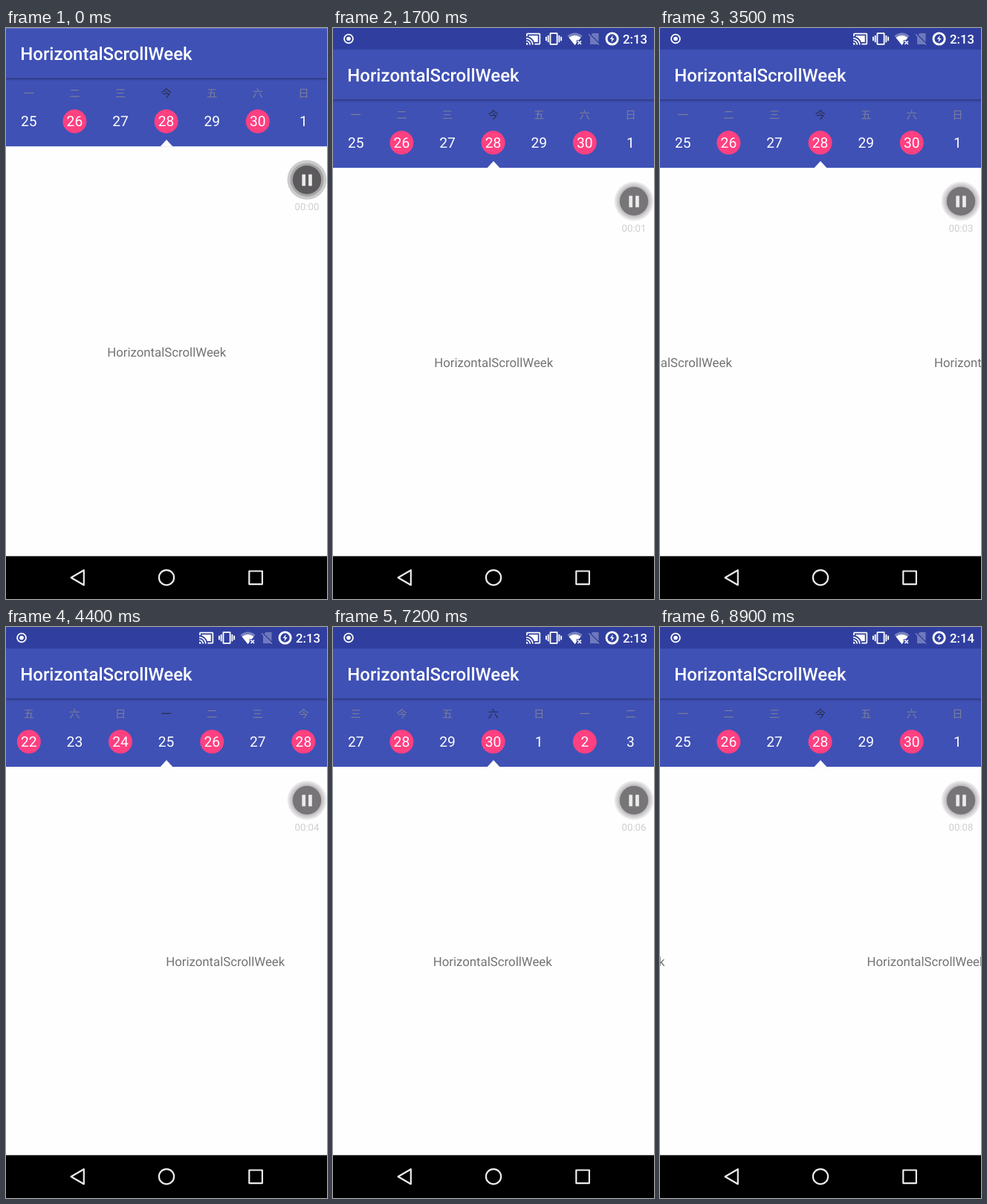
These frames come from a looping animation (432x768 px, 9000 ms). An HTML page:

```html
<!DOCTYPE html>
<html lang="zh">
<head>
<meta charset="utf-8">
<title>HorizontalScrollWeek</title>
<style>
  html, body { margin: 0; width: 100%; height: 100%; overflow: hidden; background: #fefefe; }
  svg { display: block; width: 432px; height: 768px; font-family: Roboto, sans-serif; text-rendering: geometricPrecision; }
  .mid { text-anchor: middle; }
  .label { font: 300 14.4px "Noto Sans CJK SC", "Noto Sans CJK", sans-serif; }
  .date { font-size: 19.2px; fill: #fff; }
  .page { font-size: 16.8px; fill: #737373; }
</style>
</head>
<body>
<svg viewBox="0 0 432 768">
  <defs>
    <linearGradient id="shade" x2="0" y2="1">
      <stop offset="0" stop-color="#000" stop-opacity=".18"/>
      <stop offset="1" stop-color="#000" stop-opacity="0"/>
    </linearGradient>
    <radialGradient id="glow">
      <stop offset=".7" stop-color="#b4b2b4"/>
      <stop offset=".84" stop-color="#d2d0d2"/>
      <stop offset="1" stop-color="#f4f3f4"/>
    </radialGradient>
  </defs>
  <rect width="432" height="768" fill="#fefefe"/>
  <g id="pages"></g>

  <g id="app">
    <rect y="29" width="432" height="159" fill="#3f51b5"/>
    <rect y="96" width="432" height="1.4" fill="#2f3d8a"/>
    <rect y="97.4" width="432" height="2.6" fill="url(#shade)"/>
    <text x="19.2" y="71.6" font-size="24" font-weight="500" fill="#fff">HorizontalScrollWeek</text>
    <g id="week"></g>
    <path d="M216 179l8.5 9.2h-17z" fill="#fefefe"/>
    <g id="recorder">
      <circle id="halo" cx="405" cy="233" r="26.5"/>
      <circle id="ring" cx="405" cy="233" r="22.5" fill="#a5a5a5"/>
      <circle id="disc" cx="405" cy="233" r="19.2"/>
      <path d="M398.8 226h3.900v14.800h-3.900zM407.500 226h3.900v14.800h-3.900z"
            fill="#ebedeb" stroke="#ebedeb" stroke-width=".8" stroke-linejoin="round"/>
      <text id="timer" class="mid" x="405" y="274" font-size="13.2" fill="#cfcfcf"></text>
    </g>
  </g>

  <g id="status" fill="#fff">
    <rect width="432" height="29" fill="#303f9f"/>
    <circle cx="21" cy="14.5" r="5.9" fill="none" stroke="#fff" stroke-width="1.8"/>
    <circle cx="21" cy="14.5" r="2.8"/>
    <path transform="translate(259.2 4.2) scale(.87)" d="M1 18v3h3c0-1.66-1.34-3-3-3zm0-4v2c2.76 0 5 2.24 5 5h2c0-3.87-3.13-7-7-7zm18-7H5v1.63c3.96 1.28 7.09 4.41 8.37 8.37H19V7zM1 10v2c4.97 0 9 4.03 9 9h2c0-6.08-4.93-11-11-11zm20-7H3c-1.1 0-2 .9-2 2v3h2V5h18v14h-7v2h7c1.1 0 2-.9 2-2V5c0-1.1-.9-2-2-2z"/>
    <path transform="translate(286 3.5) scale(.92)" d="M0 15h2V9H0zM3 17h2V7H3zM22 9v6h2V9zM19 17h2V7h-2zM16.5 3h-9Q6 3 6 4.5v15Q6 21 7.5 21h9q1.5 0 1.5-1.5v-15Q18 3 16.5 3zM16 19H8V5h8z"/>
    <path d="M315.5 10.5Q325.5 2.5 335.5 10.5L325.5 23z" opacity=".35"/>
    <path d="M317.5 13Q325.5 7 333.5 13L331 16H327.5V20.5L325.5 23z"/>
    <path d="M329.5 17.5l4.5 4.5m0-4.5l-4.5 4.5" stroke="#fff" stroke-width="1.6"/>
    <path d="M349.5 7H357.5V22H346V10.5z" opacity=".3"/>
    <path d="M344 7.5L358.5 22" stroke="#303f9f" stroke-width="2.6"/>
    <path d="M344 8.5L358 22.5" stroke="#fff" stroke-opacity=".35" stroke-width="1.5"/>
    <circle cx="375.6" cy="14.5" r="7.6" fill="none" stroke="#fff" stroke-width="2.9"/>
    <path d="M376.700 9.700l-4 5.300h2.600l-.7 4.200 4-5.200h-2.600z"/>
    <text id="clock" x="390" y="21" font-size="16.8" font-weight="500"></text>
  </g>

  <rect y="710.4" width="432" height="57.6"/>
  <g fill="none" stroke="#ececec" stroke-width="2.2" stroke-linejoin="round">
    <path d="M104.800 729.200v20L87.600 739.200z"/>
    <circle cx="216" cy="739.2" r="10.1"/>
    <rect x="327.300" y="730.500" width="17.600" height="17.600"/>
  </g>
</svg>

<script>
const LOOP = 9000, STEP = 100, WIDTH = 432, CELL = 61.6, TODAY = 28;
// [time, day tapped in the week strip]
const TAPS = [[2498, 25], [3450, 28], [4395, 25], [5050, 28], [7199.9, 30], [8050, 31], [8890.8, 28]];

const $ = id => document.getElementById(id);
function add(parent, tag, attrs, text = '') {
  const el = document.createElementNS('http://www.w3.org/2000/svg', tag);
  for (const key in attrs) el.setAttribute(key, attrs[key]);
  el.textContent = text;
  return parent.appendChild(el);
}

const cells = Array.from({ length: 7 }, (_, i) => {
  const x = (i + .5) * CELL;
  return {
    label: add($('week'), 'text', { class: 'label mid', x, y: 122.3, fill: i === 3 ? '#292c48' : '#7c7f99' }),
    dot: add($('week'), 'circle', { cx: x, cy: 154.3, r: 16, fill: '#ff4081' }),
    date: add($('week'), 'text', { class: 'date mid', x, y: 161 })
  };
});
for (let day = 24; day <= 32; day++)
  add($('pages'), 'text', { class: 'page mid', x: 216.2 + (day - TODAY) * WIDTH, y: 456.2 }, 'HorizontalScrollWeek');

function scrollAt(t) {
  let day = TODAY, pos = TODAY;
  for (const [start, next] of TAPS) {
    if (t < start) break;
    const u = Math.min(1, (t - start) / ((Math.abs(next - day) + 1) * 100));
    pos = day + (next - day) * (1 - (1 - u) ** 5);
    day = next;
  }
  return { day, pos };
}

function drawWeek(center) {
  cells.forEach(({ label, dot, date }, i) => {
    const day = center + i - 3;
    label.textContent = day === TODAY ? '今' : '一二三四五六日'[(day - 25 + 14) % 7];
    dot.style.display = day % 2 ? 'none' : '';
    date.textContent = day > 30 ? day - 30 : day;
  });
}

function draw(t) {
  const { day, pos } = scrollAt(t);
  const full = t < 300;
  drawWeek(day);
  $('pages').setAttribute('transform', `translate(${(TODAY - pos) * WIDTH} ${full ? -14.4 : 0})`);
  $('app').setAttribute('transform', `translate(0 ${full ? -28.8 : 0})`);
  $('status').style.display = full ? 'none' : '';

  const seconds = Math.max(0, Math.floor((t - 168) / 1005));
  $('timer').textContent = '00:0' + seconds;
  $('clock').textContent = t < 7400 ? '2:13' : '2:14';

  const idle = t >= 1600;
  $('halo').setAttribute('fill', idle ? 'url(#glow)' : '#cbcbcb');
  $('ring').style.display = idle ? 'none' : '';
  $('disc').setAttribute('fill', idle ? '#777577' : '#5c5a5c');
}

const begin = performance.now();
let shown = -1;
function tick() {
  const t = Math.floor((performance.now() - begin + 8) / STEP) * STEP % LOOP;
  if (t !== shown) draw(shown = t);
  requestAnimationFrame(tick);
}
tick();
</script>
</body>
</html>
```
